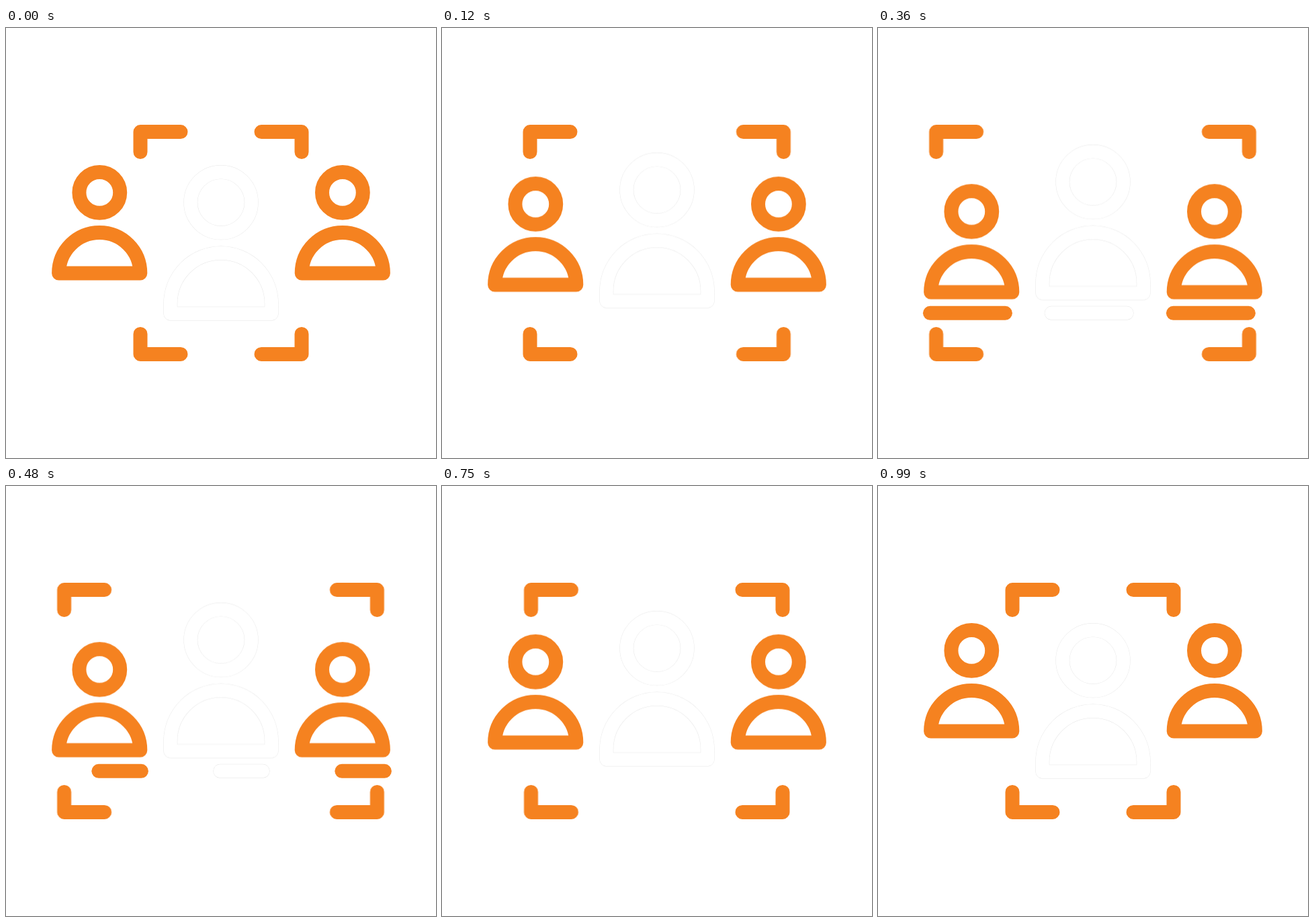
Animation, 640 px wide and 640 px high, one loop 1020 ms. Source, as an HTML page without scripts:

```html
<!DOCTYPE html>
<html lang="en">
<head>
<meta charset="utf-8">
<title>People in focus</title>
<style>
  html, body { margin: 0; width: 100%; height: 100%; overflow: hidden; background: #fff; }
  svg { display: block; width: 100%; height: 100%; }

  .ink {
    fill: none; stroke: #f58220; stroke-width: 21;
    stroke-linecap: round; stroke-linejoin: round;
  }
  .edge { stroke: #e6e6e6; stroke-width: 20.9; }
  .blank { stroke: #fff; stroke-width: 20; }

  .slide { animation: slide 1020ms cubic-bezier(.333, 0, .667, 1) infinite; }
  .left { --x: -113.4px; }
  .right { --x: 112.4px; }
  .small { --y: 28.2px; }
  .big { --y: -30.6px; }

  /* out, hold while the underline passes, back */
  @keyframes slide {
    0%, 94.7%, 100% { transform: none; }
    20.7%, 57.35% { transform: translate(var(--x, 0px), var(--y, 0px)); }
  }

  /* the lines inherit their dash from the group */
  .lines {
    animation:
      trim 1020ms cubic-bezier(.333, 0, .667, 1) infinite,
      show 1020ms step-end infinite;
  }
  @keyframes trim {
    0%, 21.5% { stroke-dasharray: 0px, 200px; stroke-dashoffset: 0px; }
    38.7% { stroke-dasharray: 124px, 200px; stroke-dashoffset: 0px; }
    55.9%, 100% { stroke-dasharray: 124px, 200px; stroke-dashoffset: -124px; }
  }
  @keyframes show {
    0%, 55.8%, 100% { opacity: 0; }
    21.6% { opacity: 1; }
  }
</style>
</head>
<body>
<svg viewBox="0 0 640 640">
  <defs>
    <g id="corners">
      <path id="corner" d="M200 184.6V154.6H260"/>
      <use href="#corner" transform="matrix(1 0 0 -1 0 640)"/>
    </g>
    <g id="person">
      <circle cx="139.3" cy="244.9" r="30.4"/>
      <path d="M78.6 365.1a60.6 60.6 0 0 1 121.2 0z"/>
    </g>
    <g id="lead">
      <circle cx="320" cy="259.6" r="45.2"/>
      <path d="M244.8 425.2V410.2a75.2 75.2 0 0 1 150.4 0V425.2z"/>
    </g>
    <path id="line" d="M77.4 424.3h124"/>
  </defs>

  <g class="ink">
    <g class="slide big">
      <use href="#lead" class="edge"/>
      <use href="#lead" class="blank"/>
    </g>
    <g class="slide small">
      <use href="#person"/>
      <use href="#person" x="361.6"/>
    </g>
    <g class="slide left"><use href="#corners"/></g>
    <g class="slide right"><use href="#corners" transform="matrix(-1 0 0 1 640 0)"/></g>
    <g class="lines">
      <use href="#line"/>
      <use href="#line" x="362"/>
      <use href="#line" x="180.8" class="edge"/>
      <use href="#line" x="180.8" class="blank"/>
    </g>
  </g>
</svg>
</body>
</html>
```
